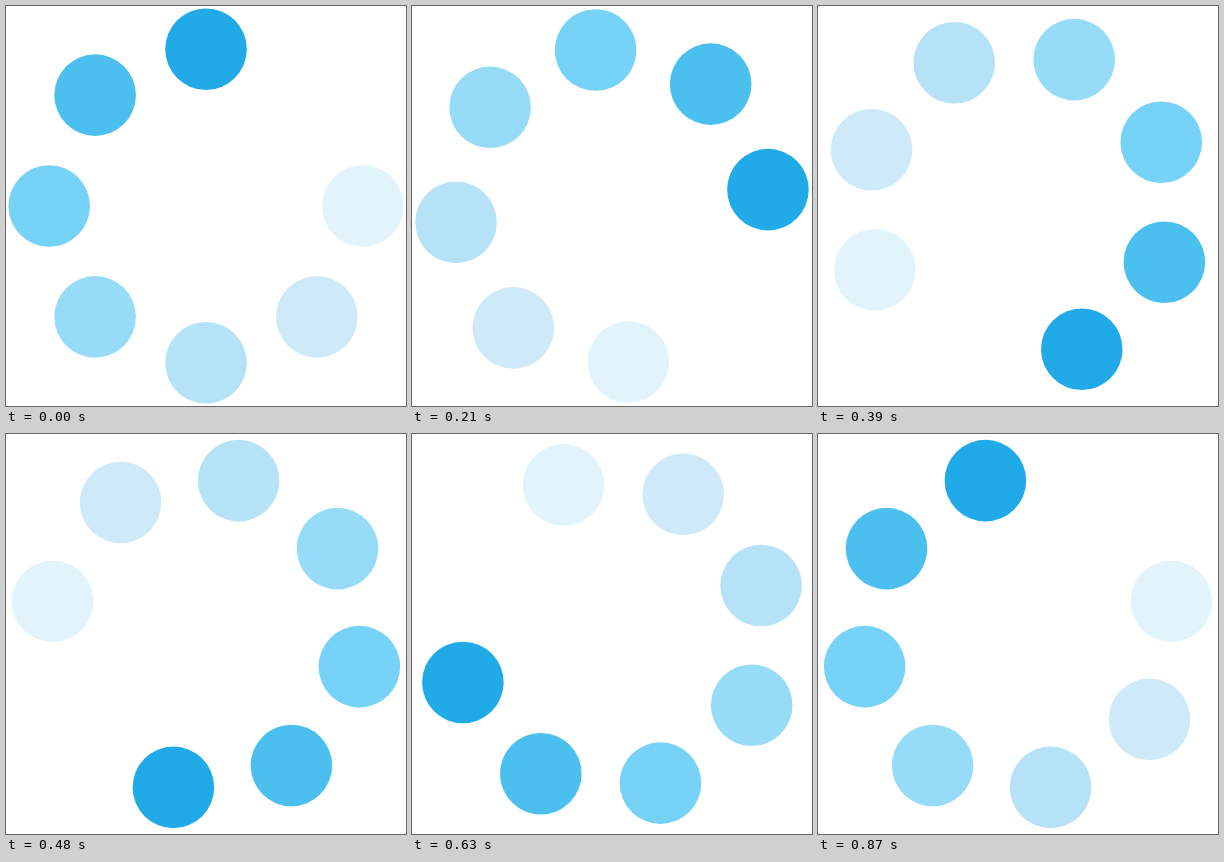
These frames come from a looping animation (400 px wide and 400 px high, 900 ms). An HTML page with a canvas:

```html
<!DOCTYPE html>
<html lang="en">
<head>
<meta charset="utf-8">
<title>Spinner</title>
<style>
  html, body { margin: 0; width: 100%; height: 100%; overflow: hidden; background: #fff; }
  canvas { display: block; width: 400px; height: 400px; }
</style>
</head>
<body>
<canvas id="stage" width="400" height="400"></canvas>
<script>
const ctx = document.getElementById('stage').getContext('2d');
const SIZE = 400, CENTER = SIZE / 2;
const ORBIT = 156.8, DOT_RADIUS = 40.8;
const STEP_MS = 30, STEPS = 30;
// From the leading dot to the tail, 45 degrees apart.
const COLORS = ['#20aae8', '#4bc0ef', '#76d2f6', '#96dbf8', '#b6e2f7', '#cee9f7', '#e3f3fc'];

function drawDot(angle, color) {
  ctx.fillStyle = color;
  ctx.beginPath();
  ctx.arc(CENTER + ORBIT * Math.sin(angle), CENTER - ORBIT * Math.cos(angle), DOT_RADIUS, 0, Math.PI * 2);
  ctx.fill();
}

function draw(elapsed) {
  const step = Math.floor(elapsed / STEP_MS + 0.001) % STEPS;
  const head = step / STEPS * Math.PI * 2;
  ctx.fillStyle = '#fff';
  ctx.fillRect(0, 0, SIZE, SIZE);
  COLORS.forEach((color, i) => drawDot(head - i * Math.PI / 4, color));
}

let start;
function tick(now) {
  start ??= now;
  draw(now - start);
  requestAnimationFrame(tick);
}
draw(0);
requestAnimationFrame(tick);
</script>
</body>
</html>
```
